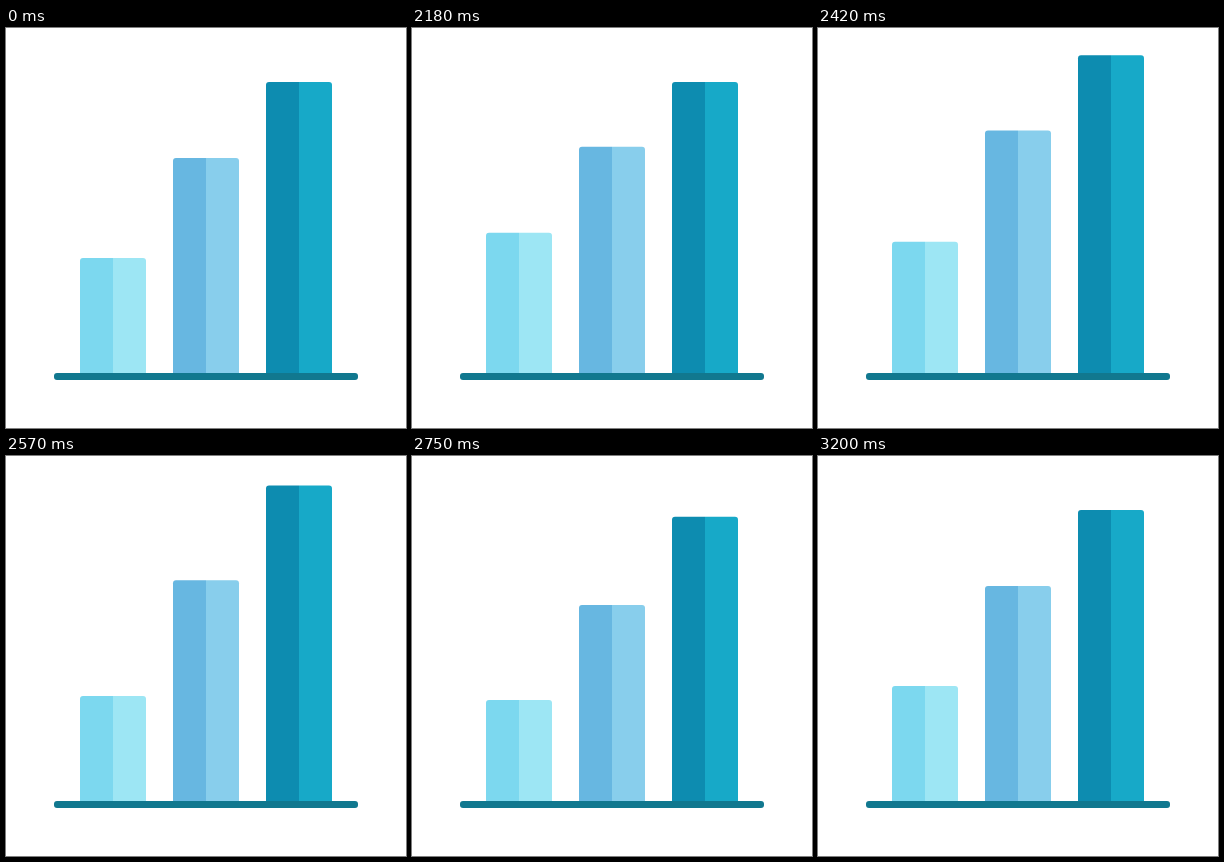
Write an HTML page that moves like this. It is 400 px wide and 400 px high and loops after 3230 ms.

```html
<!DOCTYPE html>
<html lang="en">
<head>
<meta charset="utf-8">
<title>Bar chart</title>
<style>
  html, body { margin: 0; width: 100%; height: 100%; overflow: hidden; background: #fff; }
  svg { display: block; width: 100%; height: 100%; }
</style>
</head>
<body>
<svg viewBox="0 0 400 400" xmlns="http://www.w3.org/2000/svg">
  <g id="bars"></g>
  <rect x="48" y="345" width="304" height="7" rx="3" fill="#11788f"/>
</svg>
<script>
const LOOP = 3230, START = 2000, STEP = 30;
const HALF = 33, R = 3, BASE = 349, RISE = 28;

// delay is counted in steps, dip is how far the bar sinks below rest
const bars = [
  { x: 74, top: 230, delay: 0, dip: 17, colors: ['#7cd8ef', '#9de6f4'] },
  { x: 167, top: 130, delay: 3.2, dip: 19, colors: ['#67b7e1', '#88ceec'] },
  { x: 260, top: 54, delay: 7, dip: 19, colors: ['#0d8cb0', '#17a9c8'] }
];

const group = document.getElementById('bars');
for (const bar of bars) {
  bar.halves = bar.colors.map(color => {
    const path = document.createElementNS('http://www.w3.org/2000/svg', 'path');
    path.setAttribute('fill', color);
    return group.appendChild(path);
  });
}

// Bezier easing with control points (x1, 0) and (x2, 1)
function ease(x, x1, x2) {
  let lo = 0, hi = 1;
  for (let i = 0; i < 24; i++) {
    const s = (lo + hi) / 2, r = 1 - s;
    if (3 * r * r * s * x1 + 3 * r * s * s * x2 + s * s * s < x) lo = s;
    else hi = s;
  }
  return lo * lo * (3 - 2 * lo);
}

function offset(n, dip) {
  if (n <= 0 || n >= 33) return 0;
  if (n < 10) return -RISE * ease(n / 10, 0.4, 0.1);
  if (n < 22) return -RISE + (RISE + dip) * ease((n - 10) / 12, 1 / 3, 2 / 3);
  return dip * (1 - ease((n - 22) / 11, 1 / 3, 2 / 3));
}

function drawBar({ x, top, delay, dip, halves }, n) {
  const y = top + offset(n - delay, dip);
  const mid = x + HALF, right = mid + HALF;
  halves[0].setAttribute('d', `M${x} ${BASE}V${y + R}q0 ${-R} ${R} ${-R}H${mid}V${BASE}z`);
  halves[1].setAttribute('d', `M${right} ${BASE}V${y + R}q0 ${-R} ${-R} ${-R}H${mid}V${BASE}z`);
}

function frame() {
  const t = performance.now() % LOOP;
  const n = Math.max(0, Math.floor((t - START) / STEP));
  for (const bar of bars) drawBar(bar, n);
  requestAnimationFrame(frame);
}
frame();
</script>
</body>
</html>
```
